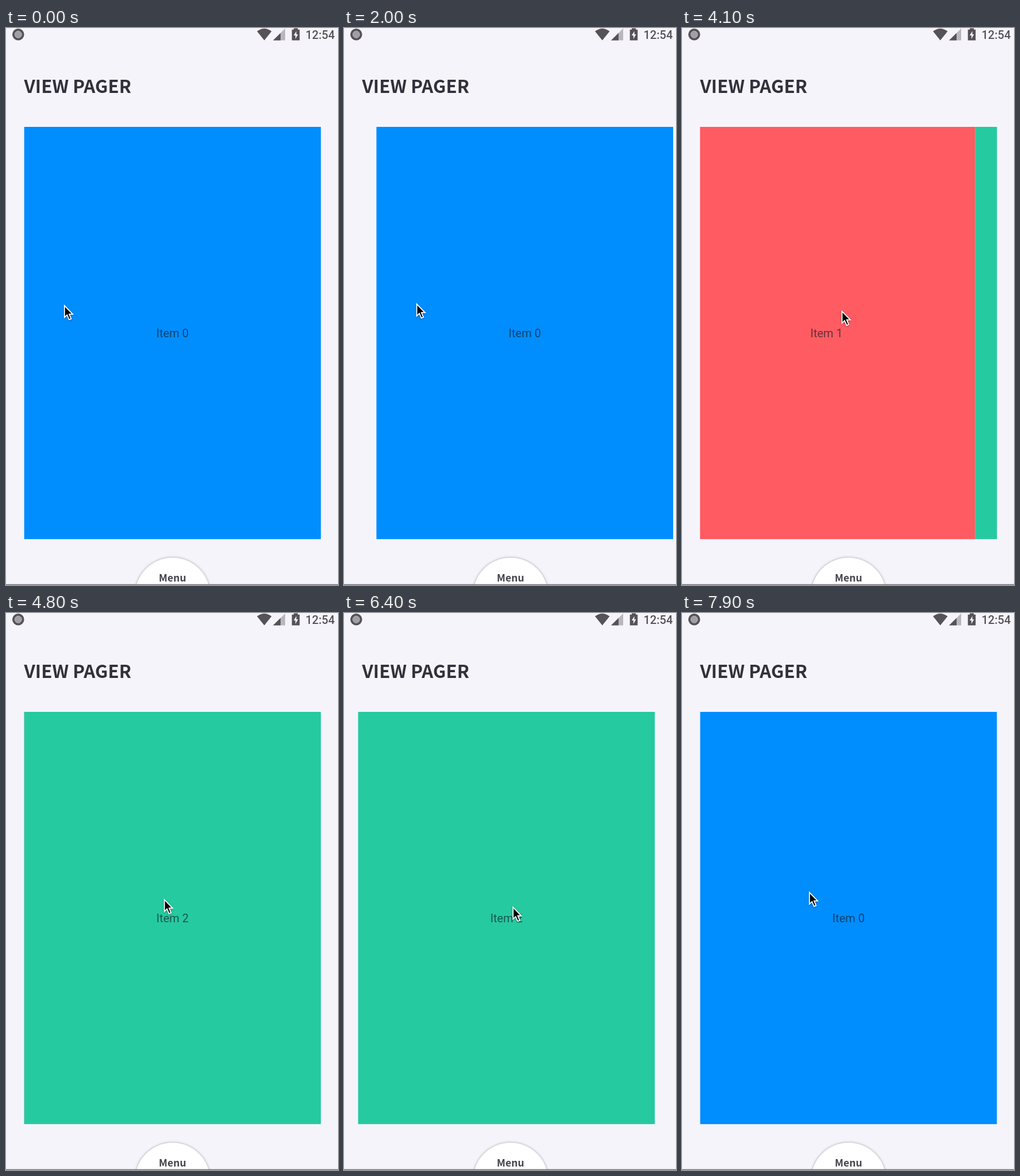
Animation, 578 px wide and 969 px high, one loop 8 s. Source, as an HTML page:

```html
<!DOCTYPE html>
<html lang="en">
<head>
<meta charset="utf-8">
<title>View pager</title>
<style>
  html, body { margin: 0; width: 100%; height: 100%; overflow: hidden; background: #f6f4fb; }
  svg { display: block; }
  .heading { font-family: "Noto Sans CJK JP", "Noto Sans CJK SC", "Open Sans", sans-serif; font-weight: 600; }
  .label { font: 20px Roboto, sans-serif; text-anchor: middle; fill: rgba(20, 25, 35, .64); }
  .clock { font: 500 20px Roboto, sans-serif; }
  .disc { filter: drop-shadow(0 0 2px rgba(0, 0, 0, .35)); }
  #cursor { filter: drop-shadow(0 1.5px 1.5px rgba(0, 0, 0, .35)); }
</style>
</head>
<body>
<svg width="100%" height="100%" viewBox="0 0 578 969">
  <rect width="578" height="969" fill="#f6f4fb"/>

  <g fill="#555358">
    <circle cx="21.3" cy="11.3" r="10.3"/>
    <circle cx="21.3" cy="11.3" r="6" fill="#a19fa4" stroke="#b3b1b6"/>
    <path d="M449.7 21.5 437 5.7Q449.7-3.7 462.4 5.7Z"/>
    <path d="M465 21.5H486V.8Z" fill="#b9b7bc"/>
    <path d="M465 21.5H478V8.7Z"/>
    <path d="M501 .5h7v2.2h3.2V21.5H497.7V2.7H501Z"/>
    <path d="M505.5 5.5 500.8 13h3v6l4.7-8h-3Z" fill="#f6f4fb"/>
    <text class="clock" x="521.5" y="19.4">12:54</text>
  </g>

  <text class="heading" x="31.5" y="112.6" font-size="31.3" fill="#32313b">VIEW PAGER</text>

  <g id="pager">
    <svg x="31.4" y="172" width="517" height="717.4">
      <g id="pages"></g>
    </svg>
  </g>

  <circle class="disc" cx="290" cy="987" r="65.5" fill="#fff"/>
  <text class="heading" x="289.8" y="962.8" font-size="17.6" fill="#45444d" text-anchor="middle">Menu</text>
  <rect y="967.6" width="578" height="1.4" fill="#737177"/>

  <path id="cursor" stroke="#fff" stroke-width="1.8"
    d="M.8 1V21.5L5.3 17.2 8.9 25.4 12.4 23.9 9 15.8H15.2Z"/>
</svg>

<script>
const LOOP = 8000, STEP = 100, PAGE_WIDTH = 517, LAST_PAGE = 2;
const DRAG_TIME = 250, SETTLE_TIME = 200, RESISTANCE = 3.17;
const RIGHTWARD = [47, 347], LEFTWARD = [316, 100];
const $ = id => document.getElementById(id);

$('pages').innerHTML = ['#008eff', '#ff5b62', '#26caa0'].map((color, i) => `
  <g transform="translate(${i * PAGE_WIDTH})">
    <rect width="${PAGE_WIDTH}" height="717.4" fill="${color}"/>
    <text class="label" x="${PAGE_WIDTH / 2}" y="366">Item ${i}</text>
  </g>`).join('');

// Where the pointer rests between swipes
const rests = [
  { t: 0, x: 101, y: 482 }, { t: 400, x: 271, y: 464 }, { t: 3100, x: 446, y: 488 },
  { t: 7100, x: 336, y: 513 }, { t: 7900, x: 221, y: 485 }
];

// Each swipe turns one page, or stretches the pager when there is none left
let current = 0;
const swipe = direction => press => {
  const from = current;
  current = Math.min(LAST_PAGE, Math.max(0, from + direction));
  const [start, end] = direction > 0 ? LEFTWARD : RIGHTWARD;
  return { press, release: press + DRAG_TIME, start, end, from, to: current };
};
const back = swipe(-1), forward = swipe(1);
const swipes = [
  ...[700, 1300, 1916].map(back),
  ...[3200, 4033, 5000, 5525, 6350].map(forward),
  ...[7110, 7450].map(back)
];

const stops = [
  ...rests,
  ...swipes.flatMap(s => [{ t: s.press, x: s.start }, { t: s.release, x: s.end }])
].sort((a, b) => a.t - b.t);

const mix = (a, b, k) => a + (b - a) * k;
const smooth = k => k * k * (3 - 2 * k);
const easeOut = k => 1 - (1 - k) ** 3;

function track(keys, axis, t) {
  const i = keys.findIndex(key => key.t > t);
  if (i < 0) return keys.at(-1)[axis];
  const a = keys[i - 1], b = keys[i];
  return mix(a[axis], b[axis], smooth((t - a.t) / (b.t - a.t)));
}

function pagerAt(t) {
  const active = swipes.findLast(s => s.press <= t);
  if (!active) return { page: 0, pull: 0 };
  const { release, start, from, to } = active;
  const moved = track(stops, 'x', Math.min(t, release)) - start;
  const k = easeOut(Math.min(1, Math.max(0, (t - release) / SETTLE_TIME)));
  return from === to
    ? { page: from, pull: mix(moved / RESISTANCE, 0, k) }
    : { page: mix(from - moved / PAGE_WIDTH, to, k), pull: 0 };
}

function draw(now) {
  const t = Math.floor(now % LOOP / STEP) * STEP;
  const { page, pull } = pagerAt(t);
  const move = (id, x, y = 0) => $(id).setAttribute('transform', `translate(${x} ${y})`);
  move('pager', pull);
  move('pages', -page * PAGE_WIDTH);
  move('cursor', track(stops, 'x', t), track(rests, 'y', t));
}

let start;
function tick(now) {
  start ??= now;
  draw(now - start);
  requestAnimationFrame(tick);
}
draw(0);
requestAnimationFrame(tick);
</script>
</body>
</html>
```
